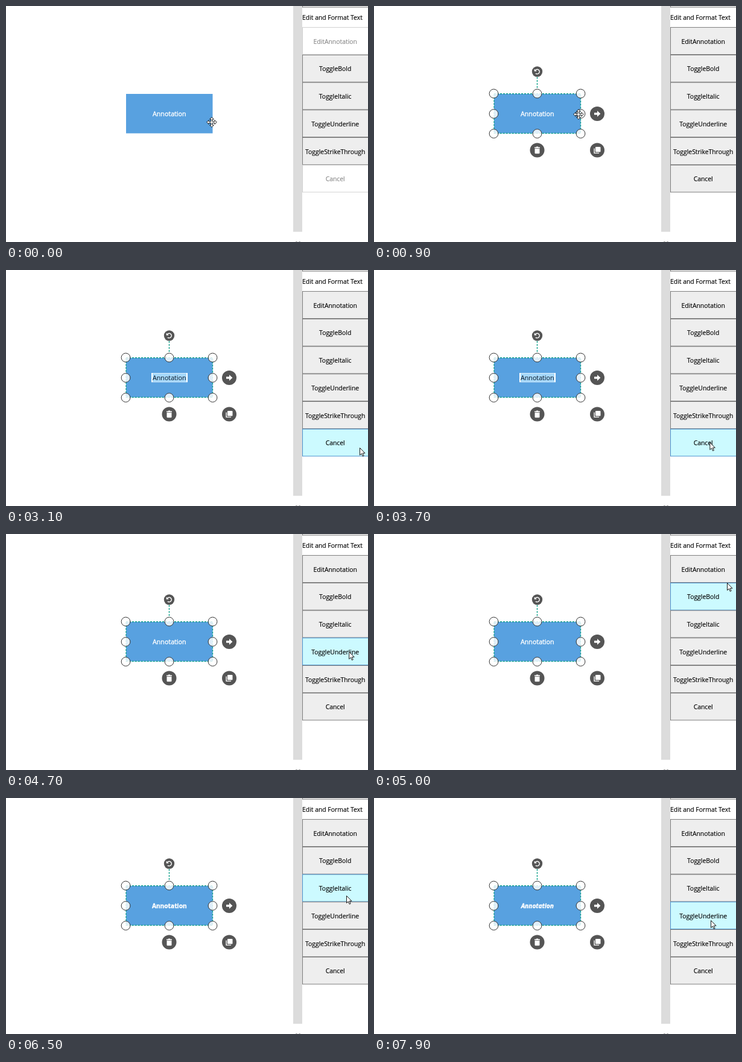
Write an HTML page that moves like this. It is 600 by 392 pixels and loops after 8000 ms.

```html
<!DOCTYPE html>
<html>
<head>
<meta charset="utf-8">
<style>
html, body { margin: 0; width: 100%; height: 100%; overflow: hidden; background: #fff; }
svg { display: block; }
text { font: 10.4px "Open Sans", "Noto Sans", sans-serif; color: #000; fill: currentColor; stroke: currentColor; stroke-width: .15; }
.mid { text-anchor: middle; }
.row { fill: #eee; stroke: #707070; stroke-width: .9; }
.row.hover { fill: #ccfaff; stroke: #3c86c8; }
.row.pressed { fill: #b4ecf5; }
.row.off { fill: #fff; stroke: #ccc; }
.off + text { color: #8a8a8a; }
#label { font-size: 10.7px; color: #fff; stroke-width: .35; }
#label.edit { color: #123; stroke-width: .1; }
#label.bold { font-size: 10.2px; font-weight: 700; }
#label.italic { font-style: italic; }
.dash { fill: none; stroke: #10a08a; stroke-width: 1.4; stroke-dasharray: 3 2; }
.disc { fill: #555; }
.icon { fill: #fff; }
.line { fill: none; stroke: #fff; stroke-width: 1.4; }
</style>
</head>
<body>
<svg width="600" height="392" viewBox="0 0 600 392">
  <rect x="476" width="15" height="375" fill="#dcdcdc"/>
  <path d="M480 391.5h3M485 391.5h3" stroke="#aaa"/>
  <rect class="row" x="491.5" y="-20" width="109" height="22"/>
  <text x="491" y="23">Edit and Format Text</text>
  <g id="rows"></g>

  <rect x="199" y="146" width="143.5" height="65.5" fill="#58a1e0"/>
  <g id="editor">
    <rect x="241" y="171" width="60" height="15.4" fill="#fff"/>
    <rect id="marked" x="243" y="171.6" width="56" height="14.2" fill="#a6d8fa"/>
  </g>
  <text id="label" x="270.8" y="183">Annotation</text>

  <g id="selection">
    <rect class="dash" x="199" y="145.8" width="143.5" height="65.7"/>
    <path class="dash" d="M270.5 118V138"/>
    <g id="handles" fill="#fff" fill-opacity=".82" stroke="#333"></g>
    <g transform="translate(270.5 109)">
      <circle class="disc" r="8.7"/>
      <path class="line" d="M-3.4 -1.6A3.8 3.8 0 1 1 -2.6 2.9"/>
      <path class="icon" d="M-4.8 -4.6V-.6H-.8Z"/>
    </g>
    <g transform="translate(370 179)">
      <circle class="disc" r="12"/>
      <path class="icon" d="M-5 -1.8H0V-5L5.4 0 0 5V1.8H-5Z"/>
    </g>
    <g transform="translate(270.5 239.5)">
      <circle class="disc" r="12"/>
      <path class="icon" d="M-4.5 -5h2.5l.8 -1h2.4l.8 1h2.5v1.4h-9ZM-4 -2.8h8v7.2q0 1.3 -1.3 1.3h-5.4q-1.3 0 -1.3 -1.3Z"/>
    </g>
    <g transform="translate(370 239.5)">
      <circle class="disc" r="12"/>
      <rect class="icon" x="-3" y="-5.5" width="8.5" height="8.5" rx="1"/>
      <path class="line" d="M-4.9 -3V4.9H3"/>
    </g>
  </g>

  <g id="cursor" fill="#fff" stroke="#000" stroke-width=".9" stroke-linejoin="round">
    <path id="arrow" d="M.5 .5V12.5L3.3 9.9 5.2 14.3 7.1 13.5 5.2 9.2H9Z"/>
    <path id="move" d="M0 -8.3L3.4 -4.9H1.2V-1.2H4.9V-3.4L8.3 0 4.9 3.4V1.2H1.2V4.9H3.4L0 8.3 -3.4 4.9H-1.2V1.2H-4.9V3.4L-8.3 0 -4.9 -3.4V-1.2H-1.2V-4.9H-3.4Z"/>
  </g>
</svg>
<script>
const $ = id => document.getElementById(id);
const LOOP = 8000, STEP = 100, TOP = 35.2, ROW = 45.72;
const commands = ['EditAnnotation', 'ToggleBold', 'ToggleItalic', 'ToggleUnderline', 'ToggleStrikeThrough', 'Cancel'];

// Pointer moves: the time each starts and ends, and where it leads
const home = [341, 193];
const moves = [
  [0, 100, 340, 201], [100, 300, 339, 180],
  [1200, 1900, 558, 62],
  [2800, 3100, 586, 295], [3100, 3300, 588, 335], [3300, 3800, 555, 284],
  [4600, 5000, 585, 81], [5000, 5100, 585, 70],
  [5200, 5500, 574, 102],
  [6200, 6500, 564, 162],
  [7300, 7600, 558, 203]
];

function add(parent, tag, attrs, text = '') {
  const el = document.createElementNS('http://www.w3.org/2000/svg', tag);
  for (const key in attrs) el.setAttribute(key, attrs[key]);
  el.textContent = text;
  return parent.appendChild(el);
}

const rows = commands.map((name, i) => {
  const y = TOP + i * ROW;
  const box = add($('rows'), 'rect', { x: 491.5, y: y + .4, width: 109, height: ROW - .8 });
  add($('rows'), 'text', { class: 'mid', x: 545.7, y: y + 27.5 }, name);
  return box;
});

for (const x of [198.5, 270.5, 342.5])
  for (const y of [145.5, 179, 212])
    if (x !== 270.5 || y !== 179) add($('handles'), 'circle', { cx: x, cy: y, r: 7.4 });

function pointer(t) {
  let [x, y] = home;
  for (const [from, to, toX, toY] of moves) {
    const k = Math.min(1, Math.max(0, (t - from) / (to - from)));
    const eased = k * (2 - k);
    x += (toX - x) * eased;
    y += (toY - y) * eased;
  }
  return [x, y];
}

const within = (t, from, to) => t >= from && t < to;
const show = (id, on) => $(id).setAttribute('visibility', on ? 'visible' : 'hidden');
const setClass = (el, names) =>
  el.setAttribute('class', Object.keys(names).filter(n => names[n]).join(' '));

function draw(t) {
  const [x, y] = pointer(t);
  const editing = within(t, 2300, 4300);
  const pressed = within(t, 2200, 2300) || within(t, 4100, 4300) || within(t, 5900, 6100) || within(t, 7000, 7200);
  const target = x > 491 ? Math.floor((y - TOP) / ROW) : -1;

  rows.forEach((box, i) => {
    const hover = i === target;
    const off = t < 900 && (i === 0 || i === rows.length - 1);
    setClass(box, { row: true, hover, pressed: hover && pressed, off });
  });

  show('selection', t >= 800);
  show('editor', editing);
  show('marked', within(t, 2300, 4100));
  setClass($('label'), { mid: true, edit: editing, bold: t >= 6100, italic: t >= 7200 });

  show('move', t < 1300);
  show('arrow', t >= 1300);
  $('cursor').setAttribute('transform', `translate(${x} ${y})`);
}

const start = performance.now();
function tick() {
  const t = (performance.now() - start) % LOOP;
  draw(Math.floor(t / STEP) * STEP);
  requestAnimationFrame(tick);
}
tick();
</script>
</body>
</html>
```
